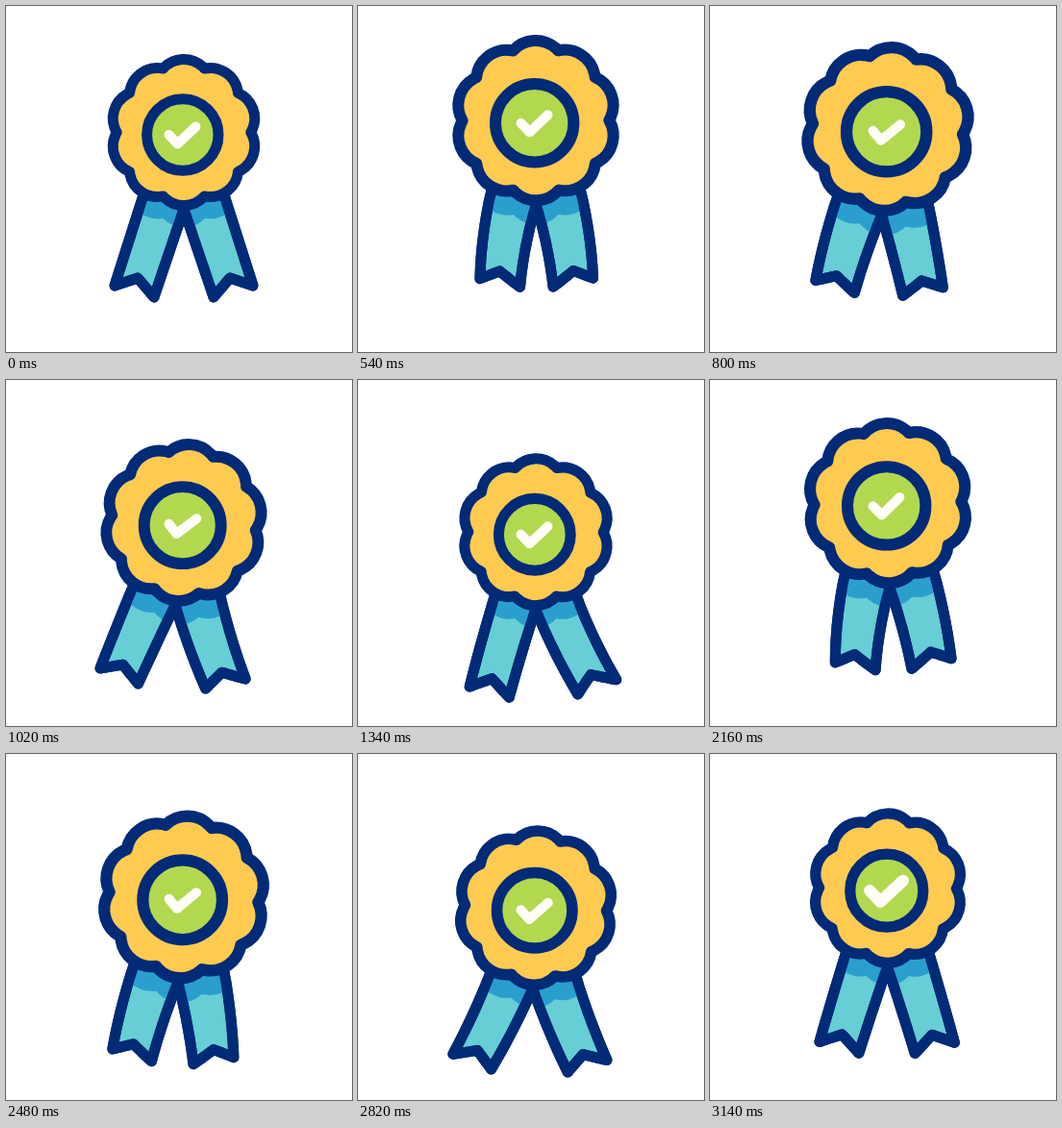
Recreate the animation shown at these times as an HTML page with a canvas. Size 360 by 360 pixels, loop 3.16 s.

```html
<!DOCTYPE html>
<html lang="en">
<head>
<meta charset="utf-8">
<title>Award ribbon</title>
<style>
html, body { margin: 0; width: 100%; height: 100%; overflow: hidden; background: #fff; }
canvas { display: block; width: 360px; height: 360px; }
</style>
</head>
<body>
<canvas id="stage" width="360" height="360"></canvas>
<script>
const ctx = document.getElementById('stage').getContext('2d');
const LOOP = 3160, CX = 185, LINE = 11, DEG = Math.PI / 180;
const NAVY = '#012a77', GOLD = '#ffca50', GREEN = '#b2d84f', TEAL = '#66ced4', BLUE = '#2a9fcd', WHITE = '#fffef8';

// Cosine swing from one turning point [time, value] to the next
const swing = (...points) => t => {
  const i = points.findIndex(p => p[0] > t);
  if (i < 1) return points[i < 0 ? points.length - 1 : 0][1];
  const [t0, v0] = points[i - 1], [t1, v1] = points[i];
  return v0 + (v1 - v0) * (1 - Math.cos(Math.PI * (t - t0) / (t1 - t0))) / 2;
};

const height = swing([220, 131.5], [590, 118.5], [1250, 159.5], [2000, 124.5], [2780, 160.5], [3340, 131.5]);
const size = swing([220, 1], [700, 1.125], [1440, 1], [2420, 1.112], [3100, 1.022]);
const tilt = swing([220, 0], [400, -1], [1020, 6], [1740, -8], [2520, 4], [3140, 0.3]);
const sway = swing([400, 0], [1500, -3], [2480, 0]);
const closing = swing([220, 0], [540, 4.5], [1140, -2], [2340, 4.3], [2850, -3], [3140, 0.6]);
const tickSize = swing([2980, 1], [3140, 1.23]);

function paint(path, fill) {
  ctx.fillStyle = fill;
  ctx.fill(path);
  ctx.strokeStyle = NAVY;
  ctx.lineWidth = LINE;
  ctx.stroke(path);
}

// Ten round lobes
const rosette = new Path2D();
for (let i = 0; i < 10; i++) {
  const a = (i * 36 - 90) * DEG;
  rosette.arc(47 * Math.cos(a), 47 * Math.sin(a), 29, a - 0.838, a + 0.838);
}
rosette.closePath();

const disc = new Path2D();
disc.arc(0, 0, 37.2, 0, 2 * Math.PI);
const tick = new Path2D('M-14 0L-5 9.5L14 -8.5');

// Left ribbon, from its outer top round to its inner top
const RIBBON = [[-37, 49.5], [-72, 159.5], [-48, 151.5], [-31, 171.5], [6, 62]];

// The top follows the rosette; the free end keeps its length and lags behind
function ribbonPath(side, scale, turn, lag) {
  const path = new Path2D();
  const add = (x, y) => {
    const u = Math.max(0, (Math.hypot(x, y) - 80) / 93);
    const a = turn + lag * u, k = scale + (1 - scale) * u;
    const c = k * Math.cos(a), s = k * Math.sin(a);
    path.lineTo(side * x * c - y * s, side * x * s + y * c);
  };
  RIBBON.forEach(([x, y], i) => {
    const [nx, ny] = RIBBON[(i + 1) % RIBBON.length];
    for (let u = 0; u < 1; u += 0.125) add(x + (nx - x) * u, y + (ny - y) * u);
  });
  path.closePath();
  return path;
}

function drawRibbon(path, scale, turn) {
  paint(path, TEAL);
  ctx.save();
  ctx.clip(path);
  ctx.translate(0, 23 * scale);
  ctx.scale(scale, scale);
  ctx.rotate(turn);
  ctx.fillStyle = BLUE;
  ctx.fill(rosette);
  ctx.restore();
  ctx.stroke(path);
}

function draw(t) {
  const scale = size(t), turn = tilt(t) * DEG;
  ctx.fillStyle = '#fff';
  ctx.fillRect(0, 0, 360, 360);
  ctx.lineJoin = ctx.lineCap = 'round';
  ctx.save();
  ctx.translate(CX, height(t));
  for (const side of [1, -1]) {
    const lag = (sway(t) - side * closing(t)) * DEG;
    drawRibbon(ribbonPath(side, scale, turn, lag), scale, turn);
  }

  ctx.save();
  ctx.scale(scale, scale);
  ctx.rotate(turn);
  paint(rosette, GOLD);
  ctx.rotate(-turn);
  ctx.translate(-1.2, 2.5);
  paint(disc, GREEN);
  ctx.restore();

  ctx.translate(-1.5, 2.5 * scale);
  ctx.rotate(turn);
  ctx.scale(tickSize(t), tickSize(t));
  ctx.strokeStyle = WHITE;
  ctx.lineWidth = 10;
  ctx.stroke(tick);
  ctx.restore();
}

const start = performance.now();
function loop() {
  draw((performance.now() - start) % LOOP);
  requestAnimationFrame(loop);
}
loop();
</script>
</body>
</html>
```
